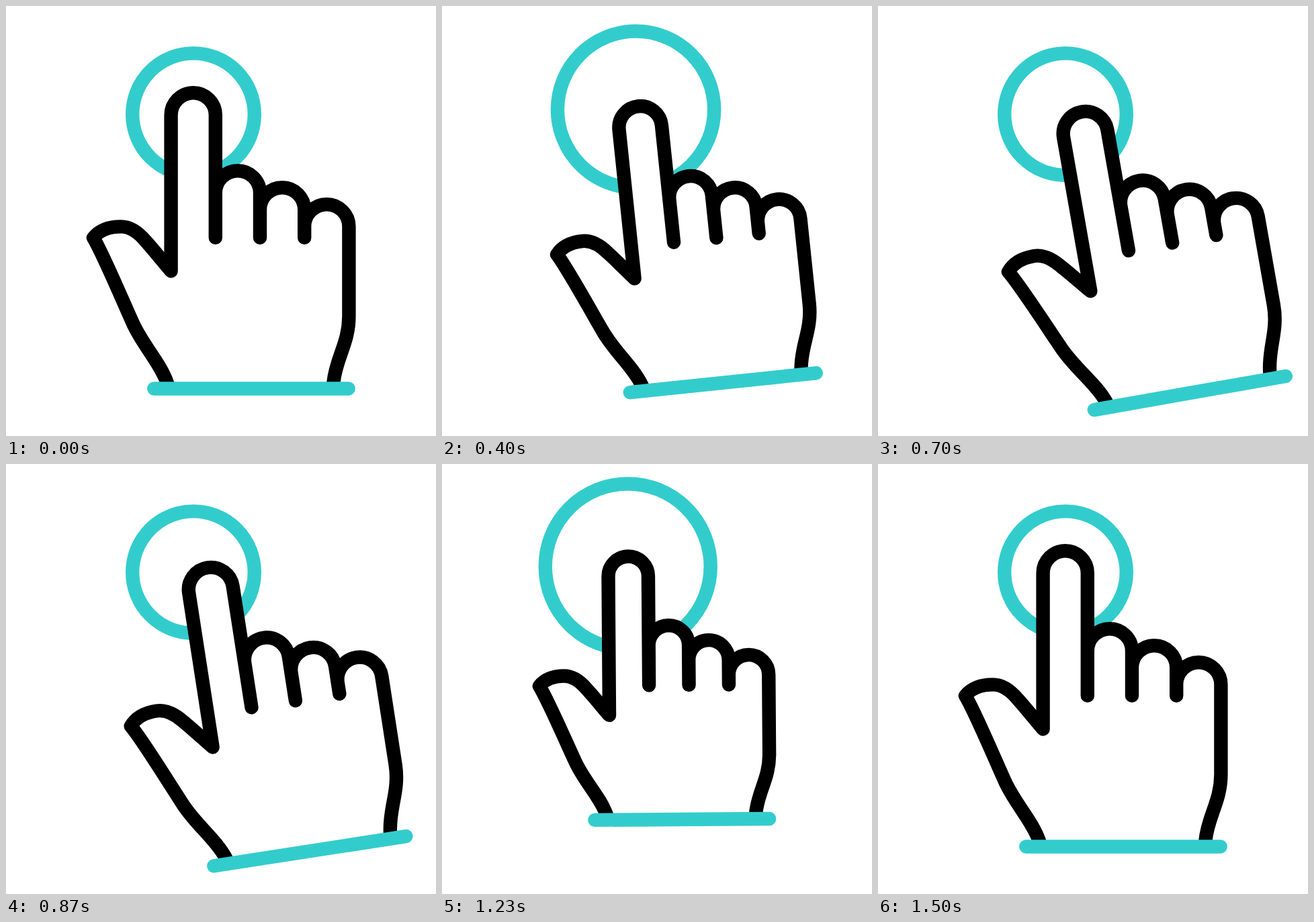
Recreate the animation shown at these times as an HTML page. Size 640 px wide and 640 px high, loop 1670 ms.

```html
<!DOCTYPE html>
<html lang="en">
<head>
<meta charset="utf-8">
<title>Tap gesture</title>
<style>
  html, body { margin: 0; width: 100%; height: 100%; overflow: hidden; background: #fff; }
  svg { display: block; width: 100%; height: 100%; }
  circle, path { stroke-width: 20.4; vector-effect: non-scaling-stroke; }
  .teal { fill: none; stroke: #3cc; stroke-linecap: round; }
  .skin { fill: #fff; stroke: #000; stroke-linejoin: round; }
</style>
</head>
<body>
<svg viewBox="0 0 640 640">
  <circle id="ring" class="teal" cx="279" cy="161.2" r="90.8"/>
  <g id="hand">
    <path class="skin" d="M242 567 L239.5 560 C229 530 201 502 187 468 C176 444 144 368 130 345
      C138 335 152 328.4 171 328.4 C189 328.4 203 344 208 350 C220 363 238 386 245.6 394.5
      V162.4 a33.1 33.1 0 0 1 66.2 0 V344.9
      V278.3 a33.1 33.1 0 0 1 66.2 0 V344.9
      V303.3 a33.1 33.1 0 0 1 66.2 0 V344.9
      V328.3 a33.1 33.1 0 0 1 66.2 0 V462
      C510.4 502 491 524 487.5 560 L487 567"/>
    <path class="teal" d="M220.3 569.5 H509.7"/>
  </g>
</svg>
<script>
const LOOP = 1670, FPS = 30;
const ring = document.getElementById('ring');
const hand = document.getElementById('hand');

const smooth = u => u * u * (3 - 2 * u);
const phase = (t, from, to) => Math.min(1, Math.max(0, (t - from) / (to - from)));

// Eased 0..1 with separate influence at departure (a) and arrival (b).
function ease(u, a, b) {
  let lo = 0, hi = 1;
  for (let i = 0; i < 24; i++) {
    const p = (lo + hi) / 2, q = 1 - p;
    const x = 3 * q * q * p * a + 3 * q * p * p * (1 - b) + p * p * p;
    if (x < u) lo = p; else hi = p;
  }
  return smooth((lo + hi) / 2);
}

// Rises from start to peak, then falls back by end.
const pulse = (t, start, peak, end) =>
  smooth(phase(t, start, peak)) - smooth(phase(t, peak, end));

function draw(ms) {
  const t = Math.floor((ms % LOOP + 3.5) * FPS / 1000);

  const wave1 = 32.2 * pulse(t, 7, 14, 21);
  const wave2 = 32.2 * pulse(t, 30, 37, 45);
  const grow = wave1 + wave2;
  ring.setAttribute('r', 90.8 + grow);
  ring.setAttribute('cx', 279 + 0.37 * wave1 - 0.07 * wave2);
  ring.setAttribute('cy', 161.2 - 0.272 * grow);

  const press = 0.1464 * (pulse(t, 2, 8, 14) + pulse(t, 29, 35, 40.5));
  const turn = 10 * (ease(phase(t, 3, 22), 0.437, 0.63) - ease(phase(t, 22, 40), 0.39, 0.5));
  hand.setAttribute('transform',
    `rotate(${-turn} 452 4) translate(253 193) ` +
    `scale(${1 - press} ${1 - 1.07 * press}) translate(-253 -193)`);
}

const begin = performance.now();
function tick() {
  draw(performance.now() - begin);
  requestAnimationFrame(tick);
}
draw(0);
requestAnimationFrame(tick);
</script>
</body>
</html>
```
